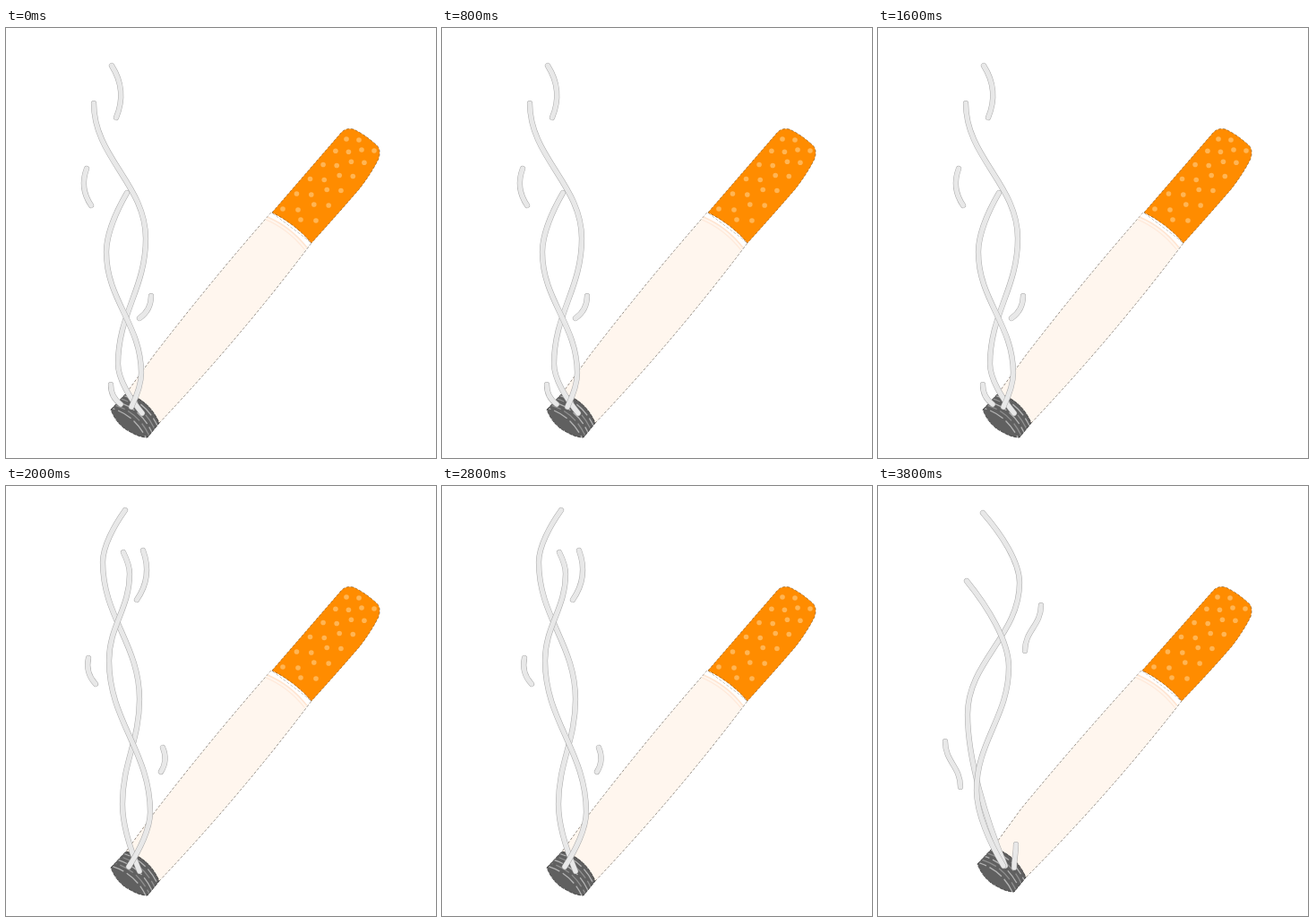
Write an HTML page with a canvas that moves like this. It is 480x480 px and loops after 4 s.

```html
<!DOCTYPE html>
<html lang="en">
<head>
<meta charset="utf-8">
<title>Smoke</title>
<style>
html, body { margin: 0; width: 100%; height: 100%; overflow: hidden; background: #fff; }
canvas { display: block; width: 480px; height: 480px; }
</style>
</head>
<body>
<canvas id="stage" width="480" height="480"></canvas>
<script>
const ctx = document.getElementById('stage').getContext('2d');
const STEP = 200;
const EDGE = 'rgba(60,50,40,0.75)';

// Turning points of the two long strands in each drawing
const waves = [
  ['98,84 156,235 125,375 152,430', '135,184 112,250 151,385 140,423'],
  ['110,52 150,162 112,310 146,425', '130,108 104,175 148,350 134,424'],
  ['133,27 108,85 149,238 130,355 149,430', '131,74 138,98 115,195 161,364 137,425'],
  ['117,30 158,108 100,255 142,424', '99,106 146,202 110,340 140,424']
];

// Ends of the short wisps
const wisps = [
  ['118,42 123,100', '90,157 95,198', '162,299 149,324', '117,398 128,420'],
  ['150,62 148,108', '81,190 90,222'],
  ['153,72 146,127', '92,192 100,221', '175,292 173,319'],
  ['182,133 164,184', '75,285 92,336', '154,400 152,426']
];

const points = text => text.split(' ').map(pair => pair.split(',').map(Number));

// Vertical at every turning point, slanted at the free ends
function wave(text) {
  const p = points(text), last = p.length - 2;
  const path = new Path2D();
  path.moveTo(...p[0]);
  for (let i = 0; i <= last; i++) {
    const [x0, y0] = p[i], [x1, y1] = p[i + 1];
    const dx = x1 - x0, dy = y1 - y0;
    const lean = i === 0 && dy < 100 ? 0.5 : 0;
    const tail = i === last ? 0.5 : 0;
    const pull = lean || tail ? 0.3 : 0.4;
    path.bezierCurveTo(x0 + dx * lean, y0 + dy * pull, x1 - dx * tail, y1 - dy * pull, x1, y1);
  }
  return path;
}

// Wisps bow to alternate sides; the last drawing has S shapes
function wisp(text, i, phase) {
  const [[x0, y0], [x1, y1]] = points(text);
  const dx = x1 - x0, dy = y1 - y0;
  const path = new Path2D();
  path.moveTo(x0, y0);
  if (phase === 3) {
    path.bezierCurveTo(x0, y0 + dy * 0.45, x1, y1 - dy * 0.45, x1, y1);
  } else {
    const bend = (i % 2 ? -1 : 1) * 0.26;
    path.quadraticCurveTo(x0 + dx / 2 + dy * bend, y0 + dy / 2 - dx * bend, x1, y1);
  }
  return path;
}

const smoke = waves.map((list, phase) => [
  ...list.map(wave),
  ...wisps[phase].map((text, i) => wisp(text, i, phase))
]);

function stroke(path, color, width, dash = []) {
  ctx.strokeStyle = color;
  ctx.lineWidth = width;
  ctx.setLineDash(dash);
  ctx.stroke(path);
  ctx.setLineDash([]);
}

function fill(path, color) {
  ctx.fillStyle = color;
  ctx.fill(path);
}

function body(x, y, fx) {
  const outline = new Path2D(
    `M${296 + fx} 206 Q${230 + x / 2} ${281 + y / 2} ${166 + x} ${364 + y}` +
    `L${134 + x} ${408 + y} Q${158 + x} ${415 + y} ${171 + x} ${441 + y}` +
    `Q${262 + x / 2} ${345 + y / 2} ${341 + fx} 240 Z`);
  fill(outline, '#fff6ee');
  stroke(outline, EDGE, 0.7, [3, 2]);

  const band = (shift, color, width) => {
    ctx.save();
    ctx.translate(fx - shift * 0.65, shift * 0.76);
    stroke(new Path2D('M296 206 Q322 217 340 240'), color, width);
    ctx.restore();
  };
  ctx.save();
  ctx.clip(outline);
  band(3, '#fff', 5);
  band(6.5, '#ffe5d2', 1.5);
  band(10, '#ffeadb', 1.3);
  ctx.restore();
}

function filter(fx) {
  const shape = new Path2D(
    `M${297 + fx} 206 L374 117 Q379 111 388 113 Q401 119 414 131 Q419 136 416 146` +
    `Q408 162 395 179 Q370 208 ${341 + fx} 240 Q${323 + fx} 219 ${297 + fx} 206 Z`);
  fill(shape, '#ff8c00');
  stroke(shape, 'rgba(90,50,0,0.7)', 0.7, [3, 2]);

  ctx.save();
  ctx.clip(shape);
  ctx.fillStyle = '#ffb554';
  for (let col = 0; col < 4; col++) {
    const side = col % 2, pair = col >> 1;
    for (let i = 0; i < 6; i++) {
      const t = (i / 5) ** 1.1;
      const x = 380 + side * 14 + pair * 17 + t * (side * 3 + pair * 3 - 71);
      const y = 124 + side + pair * 12 + t * 78;
      ctx.beginPath();
      ctx.arc(x + fx / 2, y, 2.8, 0, Math.PI * 2);
      ctx.fill();
    }
  }
  ctx.restore();
}

function ash(x, y, phase) {
  ctx.save();
  ctx.translate(x, y);
  const shape = new Path2D('M117 426 L134 408 Q160 415 171 441 L158 457 Q149 457 139 451 Q124 444 117 426 Z');
  fill(shape, '#606060');
  stroke(shape, '#333', 0.8, [4, 1]);
  ctx.clip(shape);
  // Streaks follow the burnt rim
  const rim = new Path2D('M134 408 Q159 416 171 441');
  ctx.translate(-2.2, 2.5);
  for (let i = 0; i < 5; i++) {
    ctx.lineDashOffset = i * 9 + phase * 5;
    stroke(rim, i % 2 ? '#8f8f8f' : '#b4b4b4', 1.3, [17, 4]);
    ctx.translate(-3.1, 3.6);
  }
  ctx.restore();
}

function draw(phase) {
  const odd = phase % 2;
  const x = odd * -6, y = odd * -4, fx = odd * -2;
  ctx.fillStyle = '#fff';
  ctx.fillRect(0, 0, 480, 480);
  ctx.lineCap = 'butt';
  body(x, y, fx);
  filter(fx);
  ash(x, y, phase);
  ctx.lineCap = 'round';
  for (const strand of smoke[phase]) {
    stroke(strand, '#a8a8a8', 6.2);
    stroke(strand, '#e8e8e8', 5.2);
  }
}

function tick() {
  draw(Math.floor(performance.now() / STEP) % smoke.length);
  requestAnimationFrame(tick);
}
tick();
</script>
</body>
</html>
```
